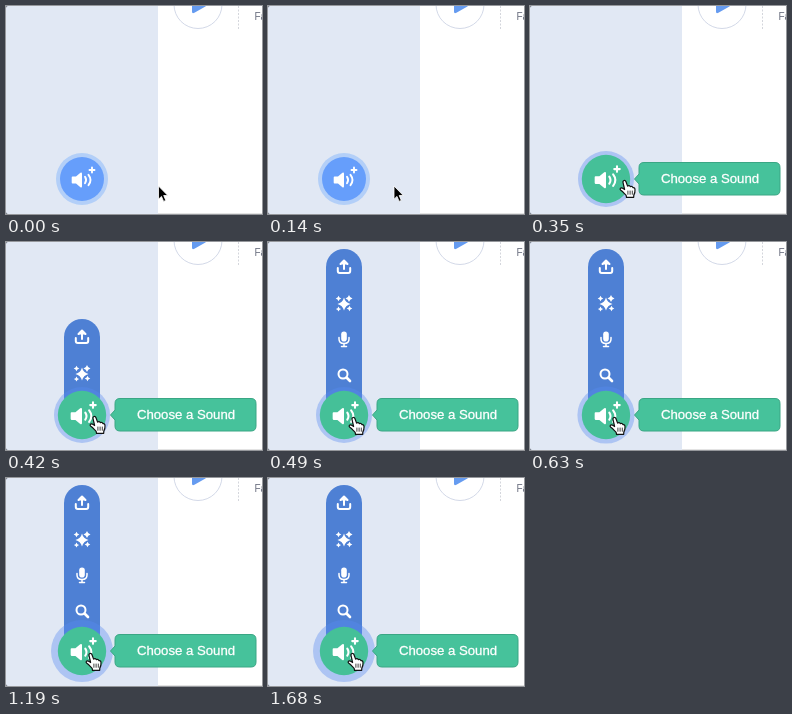
An HTML page for the animation above (1750 ms loop, 256 by 208 pixels).

```html
<!DOCTYPE html>
<html lang="en">
<head>
<meta charset="utf-8">
<title>Choose a Sound</title>
<style>
  html, body { margin: 0; width: 100%; height: 100%; overflow: hidden; background: #fff; }
  svg { display: block; width: 100vw; height: 100vh; }
  text { font-family: "Liberation Sans", Arial, sans-serif; }
  .line { fill: none; stroke: #fff; stroke-linecap: round; stroke-linejoin: round; }
</style>
</head>
<body>
<svg viewBox="0 0 256 208">
  <defs>
    <clipPath id="menuClip"><rect id="menuArea" x="58" y="7" width="36" height="166" rx="18"/></clipPath>
    <path id="spark" d="M0-1Q.2-.2 1 0Q.2.2 0 1Q-.2.2-1 0Q-.2-.2 0-1Z"/>
  </defs>

  <rect width="256" height="208" fill="#fff"/>
  <rect width="152" height="208" fill="#e1e8f4"/>
  <path d="M0 0H2Q0 0 0 2ZM0 208V206Q0 208 2 208Z" fill="#555b66"/>
  <path d="M152 207.6H256" stroke="#d8d8d8" stroke-width=".8"/>

  <circle cx="192" cy="-1.5" r="24" fill="#fff" stroke="#d3d9e8"/>
  <path d="M186-10V5.5Q186 8 188.400 6.700L199 .8Q201-.6 199-2L188-10Z" fill="#659bf0"/>
  <path d="M232.500 0V24" stroke="#d4d6dc" stroke-dasharray="2 1.500"/>
  <text x="248.500" y="14" font-size="10" fill="#6b7080">Faster</text>

  <g id="menu" clip-path="url(#menuClip)">
    <rect x="58" y="0" width="36" height="175" fill="#4e80d4"/>
    <g id="items">
      <g class="line" stroke-width="2">
        <path d="M76 27V19.500M72.500 22L76 18.500L79.500 22"/>
        <path d="M69.800 26V29Q69.800 31 71.800 31H80.200Q82.200 31 82.200 29V26"/>
        <path d="M71 95.500V97Q71 101.500 76 101.500T81 97V95.500M76 102V104.500M73.500 104.500H78.500" stroke-width="1.500"/>
        <circle cx="75" cy="132" r="4.500"/>
        <path d="M78.500 135.500L82 139" stroke-width="2.600"/>
      </g>
      <g fill="#fff">
        <path d="M72.500 22.500L76 18L79.500 22.500Z"/>
        <rect x="73.200" y="89.500" width="5.600" height="10" rx="2.800"/>
        <use href="#spark" transform="translate(76 62) scale(6.500)"/>
        <use href="#spark" transform="translate(81 56.500) scale(3.500)"/>
        <use href="#spark" transform="translate(70.500 56.500) scale(2.800)"/>
        <use href="#spark" transform="translate(81.500 66.500) scale(2.800)"/>
        <use href="#spark" transform="translate(70.500 67) scale(2.600)"/>
      </g>
    </g>
  </g>

  <circle id="ring" cx="76" cy="173" r="26"/>
  <g id="button">
    <circle id="disc" r="22"/>
    <path d="M-9.500-2.500H-6L-1.600-6.200Q0-7 0-5.200V7.200Q0 9 -1.600 8.200L-6 4.500H-9.500Q-10.300 4.500-10.300 3.500V-1.500Q-10.300-2.500-9.500-2.500Z" fill="#fff"/>
    <g class="line" stroke-width="1.900">
      <path d="M3-2.200Q5.200 1 3 4.200M6.500-4.200Q10.500 1 6.500 6.200"/>
      <path d="M10-11.500V-6.500M7.500-9H12.500"/>
    </g>
  </g>

  <g id="tip">
    <path d="M114 156.500H245Q250 156.500 250 161.500V184Q250 189 245 189H114Q109 189 109 184V178L104.500 173L109 168V161.500Q109 156.500 114 156.500Z"
      fill="#46c29b" stroke="#3aa684"/>
    <text x="180" y="177" font-size="13.200" text-anchor="middle" fill="#fff" stroke="#fff" stroke-width=".3">Choose a Sound</text>
  </g>

  <path id="arrow" d="M0 0V13.200L3 10.400L5.100 15.400L7.300 14.400L5.200 9.500H9.300Z" fill="#000" stroke="#fff" stroke-width=".8"/>
  <g id="hand" stroke-linejoin="round" stroke-linecap="round" stroke="#111">
    <path d="M-2 1.800C-2.400-.3.300-.7 1 1.200L2.600 5.600C3.400 4.700 5 5 5.300 6.200C6.400 5.500 7.600 6 7.900 7.200C9.300 6.800 10 7.800 10 9.200C10.200 12 9.500 13.200 8.800 14.600L8.700 16.800H1.500L1.200 15C-.5 13.400-2 11.200-4.200 9.800C-5.800 8.400-4.300 6.800-2.700 7.600L-.4 9Z" fill="#fff" stroke-width="1.200"/>
    <path d="M2.900 10.500V13.800M5.100 10.500V13.800M7.300 10.500V13.800" stroke-width=".8"/>
  </g>
</svg>
<script>
const LOOP = 1750, STEP = 70, HOVER = 350;
const el = id => document.getElementById(id);
const parts = Object.fromEntries(
  ["menu", "menuArea", "items", "ring", "button", "disc", "tip", "arrow", "hand"].map(id => [id, el(id)]));

// Pointer x at each step until it comes to rest
const pointerX = [152.5, 139, 126, 114, 104, 95, 89, 86, 85];

const progress = (t, from, to) => Math.min(1, Math.max(0, (t - from) / (to - from)));
const show = (node, on) => node.setAttribute("visibility", on ? "visible" : "hidden");
const move = (node, x, y, scale = 1) =>
  node.setAttribute("transform", `translate(${x} ${y}) scale(${scale})`);

function draw(time) {
  const step = Math.floor(time / STEP), t = step * STEP;
  const hover = t >= HOVER;
  const x = pointerX[Math.min(step, pointerX.length - 1)];

  show(parts.arrow, !hover);
  show(parts.hand, hover);
  show(parts.tip, hover);
  move(parts.arrow, x, 180);
  move(parts.hand, x, t < 490 ? 174.5 : 175.5);

  const drop = 140 * (1 - progress(t, HOVER, 490));
  show(parts.menu, t > HOVER);
  parts.menuArea.setAttribute("y", 7 + drop);
  parts.menuArea.setAttribute("height", 166 - drop);
  move(parts.items, 0, drop);

  move(parts.button, 76, 173, hover ? 1.1 : 1);
  parts.disc.setAttribute("fill", hover ? "#45c098" : "#669efb");
  parts.ring.setAttribute("r", hover ? 28 + 3 * progress(t, 560, 910) : 26);
  parts.ring.setAttribute("fill", hover ? "rgba(87,137,240,.38)" : "rgba(102,166,252,.38)");
}

const start = performance.now();
function tick() {
  draw((performance.now() - start) % LOOP);
  requestAnimationFrame(tick);
}
tick();
</script>
</body>
</html>
```
